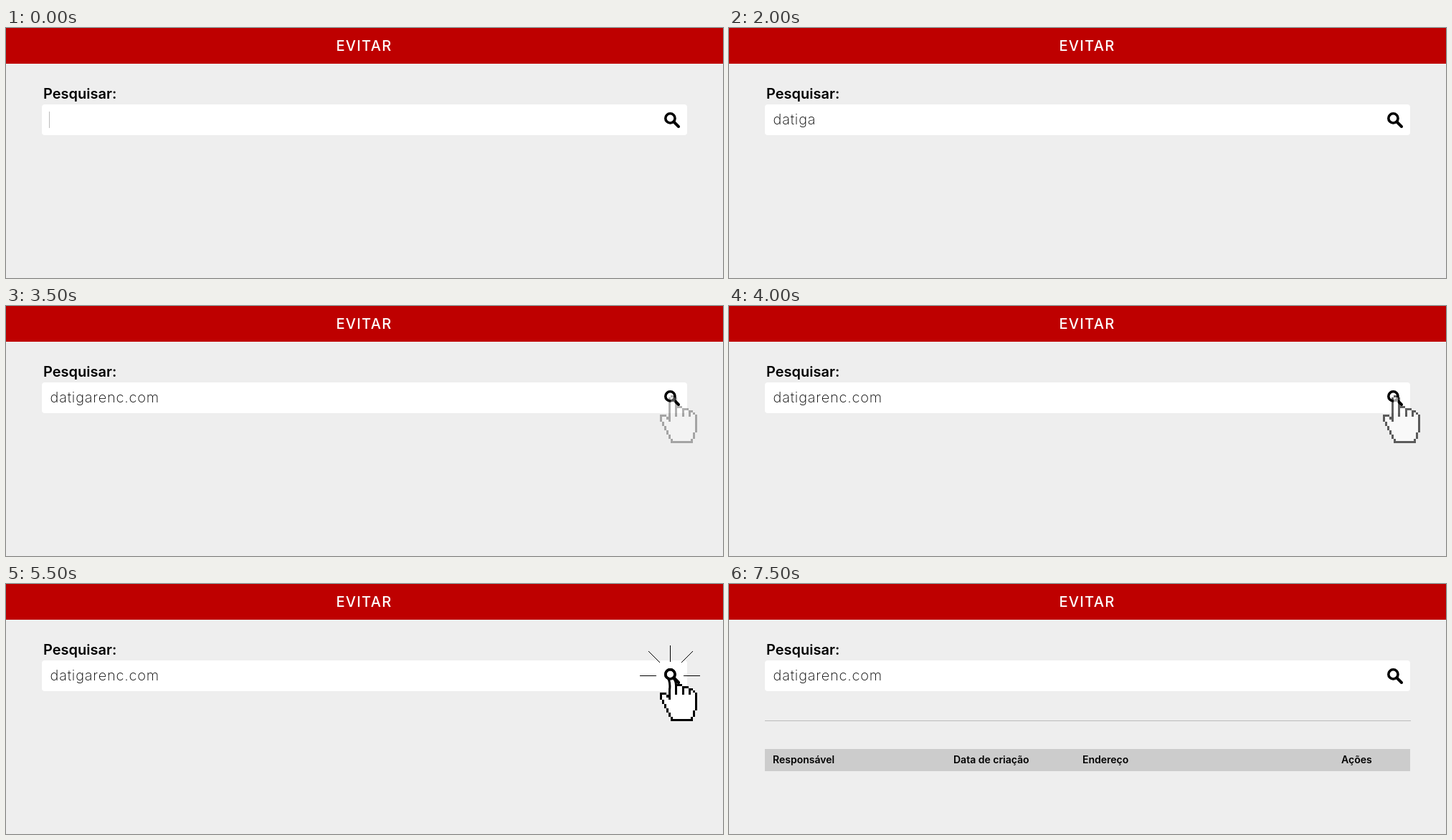
Write an HTML page with a canvas that moves like this. It is 1000x350 px and loops after 8 s.

```html
<!DOCTYPE html>
<html lang="pt">
<head>
<meta charset="utf-8">
<title>Pesquisar</title>
<style>
  html, body { margin: 0; width: 1000px; height: 350px; overflow: hidden; background: #eee; }
  canvas { display: block; }
</style>
</head>
<body>
<canvas id="stage" width="1000" height="350"></canvas>
<script>
const LOOP = 8000;
const STEP = 500;
const ctx = document.getElementById('stage').getContext('2d');
const chunks = ['da', 'tiga', 'renc', '.com'];

function rect(color, x, y, w, h) {
  ctx.fillStyle = color;
  ctx.fillRect(x, y, w, h);
}

function text(value, x, y, size, weight, color = '#000', spacing = 0) {
  ctx.font = `${weight} ${size}px Inter, sans-serif`;
  ctx.letterSpacing = spacing + 'px';
  ctx.fillStyle = color;
  ctx.fillText(value, x, y);
}

function line(x1, y1, x2, y2, width = 1) {
  ctx.lineWidth = width;
  ctx.beginPath();
  ctx.moveTo(x1, y1);
  ctx.lineTo(x2, y2);
  ctx.stroke();
}

// Pointer on a 17 x 22 cell grid: a filled outline whose edges step cell by cell.
function makeHand(pressed) {
  const canvas = document.createElement('canvas');
  canvas.width = 17;
  canvas.height = 22;
  const g = canvas.getContext('2d');
  const outline = 'M4 11 4 1 5 0 6 0 7 1 7 5 9 5 10 6 12 6 13 7 14 7 16 9 16 15 14 21 5 21 0 11 0 9 2 9Z';
  const values = outline.match(/\d+/g).map(Number);
  const count = values.length / 2;
  const corner = i => [values[i % count * 2], values[i % count * 2 + 1]];

  const edge = ([x1, y1], [x2, y2]) => {
    const n = Math.max(Math.abs(x2 - x1), Math.abs(y2 - y1));
    for (let i = 0; i <= n; i++) {
      g.fillRect(Math.round(x1 + (x2 - x1) * i / n), Math.round(y1 + (y2 - y1) * i / n), 1, 1);
    }
  };

  g.translate(0.5, 0.5);
  g.fillStyle = '#fff';
  g.fill(new Path2D(outline));
  g.translate(-0.5, -0.5);
  g.fillStyle = '#000';
  for (let i = 0; i < count; i++) edge(corner(i), corner(i + 1));
  for (let x = 7; x <= 13; x += 3) edge([x, 7], [x, 9]);
  edge([7, 5], [7, 9]);
  if (pressed) {
    g.clearRect(0, 0, 7, 7);
    g.clearRect(7, 0, 1, 5);
  }
  return canvas;
}

const hand = makeHand(false);
const pressedHand = makeHand(true);

function drawHand(image, alpha) {
  ctx.imageSmoothingEnabled = false;
  ctx.globalAlpha = alpha;
  ctx.drawImage(image, 912, 125, 52, 67);
  ctx.globalAlpha = 1;
}

function drawMagnifier() {
  ctx.strokeStyle = '#000';
  ctx.lineWidth = 3.6;
  ctx.beginPath();
  ctx.arc(926.4, 126.4, 6.6, 0, Math.PI * 2);
  ctx.stroke();
  ctx.lineCap = 'round';
  line(931.5, 131.5, 938, 138, 4);
  ctx.lineCap = 'butt';
}

// The index finger bends under the lens while five rays flash around it.
function drawPress() {
  const finger = new Path2D('M923.5 132Q926.5 138 925.7 147H934.5Q934.5 138 931 132');
  ctx.fillStyle = '#fff';
  ctx.fill(finger);
  drawHand(pressedHand, 1);
  ctx.lineWidth = 3;
  ctx.stroke(new Path2D('M923.5 132Q926.5 138 925.7 147M931 132Q934.5 136 934.5 142'));
  drawMagnifier();

  line(926.5, 86, 926.5, 109);
  for (const side of [-1, 1]) {
    line(926 + side * 19, 128.5, 926 + side * 42, 128.5);
    line(927 + side * 15, 110, 927 + side * 31, 94);
  }
}

function drawResults() {
  rect('#bbb', 50, 191, 901, 1);
  rect('#ccc', 50, 231, 900, 31);
  const heading = (label, x) => text(label, x, 251, 14, 600);
  heading('Responsável', 61);
  heading('Data de criação', 313);
  heading('Endereço', 493);
  heading('Ações', 854);
}

function draw(t) {
  rect('#eee', 0, 0, 1000, 350);
  rect('#be0000', 0, 0, 1000, 50);
  text('EVITAR', 460.5, 32, 20, 500, '#fff', 1.3);
  text('Pesquisar:', 52, 99, 20, 600);
  ctx.fillStyle = '#fff';
  ctx.beginPath();
  ctx.roundRect(50, 107, 900, 43, 4);
  ctx.fill();
  drawMagnifier();

  const typed = Math.max(0, Math.floor(t / STEP) - 2);
  if (!typed) rect('#bbb', 60, 117, 1, 23);
  text(chunks.slice(0, typed).join(''), 61.5, 135, 20, 200, '#000', 0.8);

  if (t >= 7500) drawResults();
  else if (t >= 5500 && t < 6500) drawPress();
  else if (t >= 3500) drawHand(hand, Math.min(1, Math.floor((t - 3000) / STEP) * 0.31 + 0.07 * (t >= 4500)));
}

const start = performance.now();
function frame() {
  draw((performance.now() - start) % LOOP);
  requestAnimationFrame(frame);
}
frame();
</script>
</body>
</html>
```
